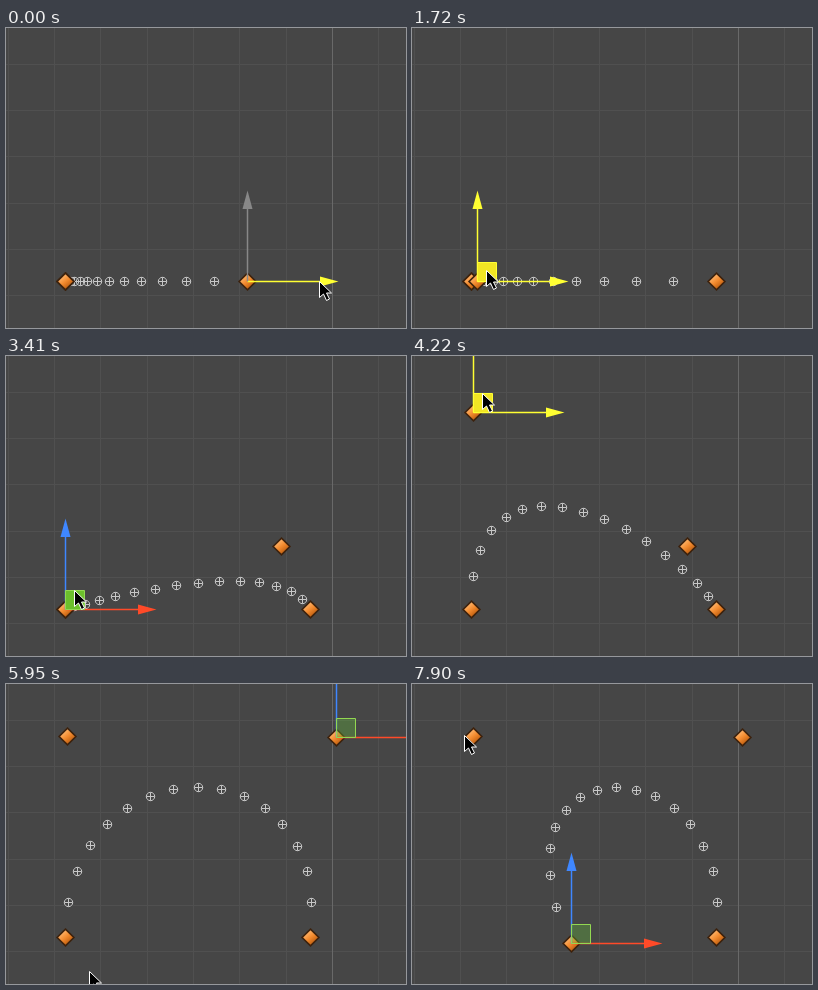
Write an HTML page with a canvas that moves like this. It is 400 px wide and 300 px high and loops after 8000 ms.

```html
<!DOCTYPE html>
<html lang="en">
<head>
<meta charset="utf-8">
<title>Bezier handles</title>
<style>
html, body { margin: 0; width: 100%; height: 100%; overflow: hidden; background: #464646; }
canvas { display: block; }
</style>
</head>
<body>
<canvas id="stage" width="400" height="300"></canvas>
<script>
const ctx = document.getElementById('stage').getContext('2d');
const LOOP = 8000, HOVER = 90, LINGER = 100;
const ORIGIN = { x: 59, y: 253 };

// A drag eases one control point to a new place, bowing vertically by bend.
// The pointer comes from enter, holds the point at grab, and goes off to leave.
const drags = [
  { point: 3, select: 0, start: 0, end: 440, to: { x: 304, y: 253 }, grab: { x: 72, y: 0 }, axis: true,
    leave: { t: 500, x: 300, y: 258 } },
  { point: 2, select: 1210, start: 1660, end: 2280, to: { x: 275, y: 190 }, bend: 19, grab: { x: 9, y: -11 },
    enter: { t: 1420, x: 100, y: 240 }, leave: { t: 2380, x: 150, y: 228 } },
  { point: 1, select: 3010, start: 3470, end: 4290, to: { x: 61, y: 52 }, grab: { x: 9, y: -19 },
    enter: { t: 3160, x: 13, y: 165 }, leave: { t: 4840, x: 312, y: 150 } },
  { point: 2, select: 4840, start: 5100, end: 5700, to: { x: 330, y: 53 }, grab: { x: 9, y: -11 },
    enter: { t: 4840, x: 312, y: 150 }, leave: { t: 6000, x: 33, y: 335 } },
  { point: 0, select: 6250, start: 6600, end: 7500, to: { x: 159, y: 259 }, bend: -25, grab: { x: 9, y: -11 },
    enter: { t: 6250, x: 60, y: 301 }, leave: { t: 7900, x: 52, y: 51 } }
];

const progress = (t, t0, t1) => Math.min(1, Math.max(0, (t - t0) / (t1 - t0)));
const smooth = u => u * u * (3 - 2 * u);
const mix = (a, b, k) => ({ x: a.x + (b.x - a.x) * k, y: a.y + (b.y - a.y) * k });
const add = (a, b) => ({ x: a.x + b.x, y: a.y + b.y });

function dragged(from, drag, t) {
  const k = smooth(progress(t, drag.start, drag.end));
  const p = mix(from, drag.to, k);
  p.y += (drag.bend || 0) * Math.sin(Math.PI * k);
  return p;
}

function pointerAt(drag, point, t) {
  const held = add(point, drag.grab), { enter, leave } = drag;
  if (t < drag.start) return mix(enter, held, progress(t, enter.t, drag.start - HOVER));
  return mix(held, leave, progress(t, drag.end, leave.t));
}

function shape(points, fill, stroke) {
  ctx.beginPath();
  points.forEach(p => ctx.lineTo(...p));
  ctx.closePath();
  if (fill) { ctx.fillStyle = fill; ctx.fill(); }
  if (stroke) { ctx.strokeStyle = stroke; ctx.stroke(); }
}

function line(x0, y0, x1, y1, color) {
  ctx.strokeStyle = color;
  ctx.beginPath();
  ctx.moveTo(x0, y0);
  ctx.lineTo(x1, y1);
  ctx.stroke();
}

// Draws around a pixel centre so thin lines stay crisp.
function at({ x, y }, paint) {
  ctx.save();
  ctx.translate(Math.round(x) + .5, Math.round(y) + .5);
  paint();
  ctx.restore();
}

function drawGrid() {
  ctx.fillStyle = '#464646';
  ctx.fillRect(0, 0, 400, 300);
  for (let i = 0; i < 9; i++) {
    const x = Math.floor(2 + i * 46.35) + .5, y = Math.round(36 + i * 46.2) + .5;
    line(0, y, 400, y, '#505050');
    line(x, 0, x, 300, i === 7 ? '#696969' : '#505050');
  }
}

function drawMarker() {
  const r = 4.2, color = '#c8c8c8';
  line(-r, 0, r, 0, color);
  line(0, -r, 0, r, color);
  ctx.beginPath();
  ctx.arc(0, 0, r, 0, 7);
  ctx.stroke();
}

function drawDiamond() {
  const diamond = r => [[0, -r], [r, 0], [0, r], [-r, 0]];
  const fill = ctx.createLinearGradient(-4, -5, 4, 5);
  fill.addColorStop(0, '#ffb469');
  fill.addColorStop(.5, '#f28a2e');
  fill.addColorStop(1, '#c05f10');
  ctx.lineWidth = 1.6;
  shape(diamond(8.4), fill, '#3c220e');
}

function drawArrow(color) {
  ctx.lineWidth = 1.5;
  line(0, 0, 73, 0, color);
  shape([[72.5, -5], [91, 0], [72.5, 5]], color);
}

function drawHandles(axisX, axisY, fill, edge) {
  drawArrow(axisX);
  ctx.save();
  ctx.rotate(-Math.PI / 2);
  drawArrow(axisY);
  ctx.restore();
  ctx.lineWidth = 1;
  if (fill) shape([[0, 0], [19, 0], [19, -19], [0, -19]], fill, edge);
}

function drawPointer() {
  shape([[0, 0], [0, 16], [4, 12.5], [7, 19], [10, 17.5], [7, 11.5], [12, 11.5]], '#000', '#fff');
}

function drawCurve(points) {
  for (let i = 1; i < 16; i++) {
    let level = points;
    while (level.length > 1) level = level.slice(1).map((p, j) => mix(level[j], p, i / 16));
    at({ x: level[0].x - .5, y: level[0].y }, drawMarker);
  }
}

function draw(t) {
  const points = [ORIGIN, ORIGIN, ORIGIN, { x: 241, y: 253 }];
  const active = drags.filter(d => d.select <= t).pop();
  for (const d of drags) if (d.start <= t) points[d.point] = dragged(points[d.point], d, t);

  ctx.lineWidth = 1;
  drawGrid();
  drawCurve(points);
  points.forEach(p => at(p, drawDiamond));

  const point = points[active.point];
  const visible = t >= (active.enter || active.start && active.enter || { t: 0 }).t && t < active.leave.t + LINGER;
  const pointer = pointerAt(active, point, t);
  const dragging = t >= active.start && t <= active.end;
  const dx = pointer.x - point.x, dy = point.y - pointer.y;
  const hover = visible && dx >= 0 && dx <= 20 && dy >= 0 && dy <= 20;

  at(point, () => {
    if (dragging && active.axis) drawHandles('#ffff32', '#888');
    else if (dragging) drawHandles('#ffff32', '#ffff32', '#f1e524', '#ffff32');
    else drawHandles('#ff4a28', '#3f87ff', hover ? '#6cc02c' : 'rgba(100,190,60,.33)', '#93d852');
  });
  if (visible) at(pointer, drawPointer);
}

function frame(now) {
  draw(now % LOOP);
  requestAnimationFrame(frame);
}
requestAnimationFrame(frame);
</script>
</body>
</html>
```
